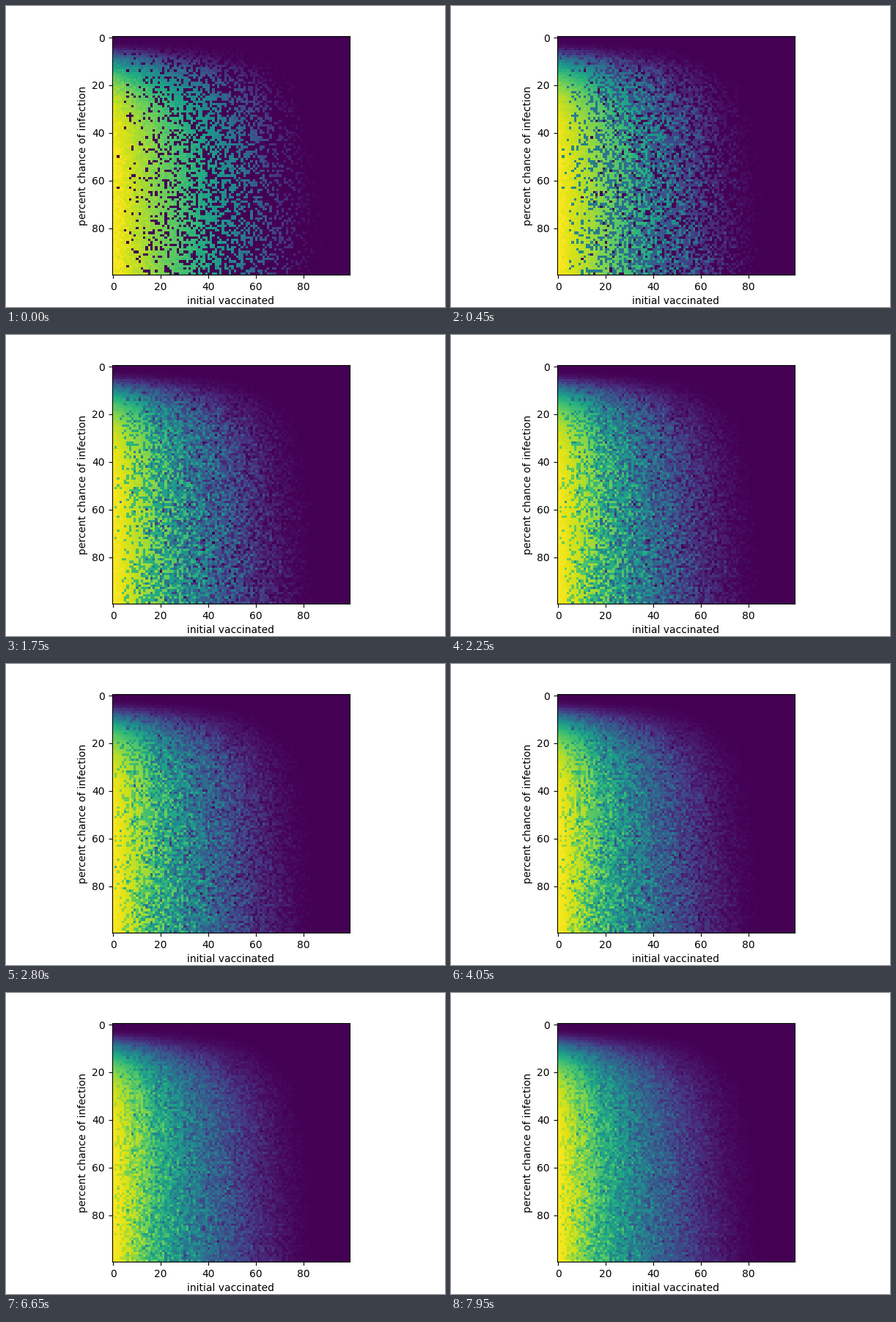
A matplotlib script for the animation above (8000 ms loop, 599 px wide and 410 px high).

```python
import numpy as np
import matplotlib.pyplot as plt
from matplotlib.animation import FuncAnimation

W, H, DPI = 599, 410, 100
STEP, LOOP = 50, 8000
STARTS = [0, 450, 1000, 1750, 2250, 2800, 3450, 4050,
          4700, 5350, 6000, 6650, 7300, 7950]
N = 100
LEFT, TOP, SIDE = 144.5, 41.4, 324.7

rng = np.random.default_rng(7)
chance = np.arange(N)[:, None]                    # percent, down the rows
open_share = 1 - np.arange(N)[None, :] / N        # unvaccinated, along columns
contact = chance * open_share

# Expected outbreak size: a soft threshold in the infection chance, cut off
# where too few unvaccinated neighbours are left to pass it on.
spread = 1 - np.exp(-np.log1p(np.exp(contact - 4.5)) / 9)
linked = 1 - np.exp(-(open_share / 0.3) ** 2)
size = open_share * spread * linked
sigma = 0.012 + 0.4 * np.exp(-contact / 5) + 0.5 * np.exp(-open_share / 0.2)
start_odds = open_share + rng.normal(0, 0.02, (1, N)) * (open_share < 0.95)


def run():
    """One trial per cell; it stays at zero if the first case is vaccinated."""
    caught = rng.random((N, N)) < start_odds
    return caught * np.clip(size * (1 + sigma * rng.normal(size=(N, N))), 0, 1)


runs = np.array([run() for _ in STARTS])
means = np.cumsum(runs, axis=0) / np.arange(1, len(runs) + 1)[:, None, None]

# The small margin keeps the pixel size from being rounded down.
fig = plt.figure(figsize=((W + 0.01) / DPI, (H + 0.01) / DPI), dpi=DPI,
                 facecolor="white")
ax = fig.add_axes([LEFT / W, 1 - (TOP + SIDE) / H, SIDE / W, SIDE / H])
image = ax.imshow(means[0], cmap="viridis", vmin=0, vmax=1,
                  interpolation="nearest", aspect="auto")
ax.set_xticks(range(0, N, 20))
ax.set_yticks(range(0, N, 20))
ax.set_xlabel("initial vaccinated")
ax.set_ylabel("percent chance of infection")


def draw(i):
    shown = np.searchsorted(STARTS, i * STEP, side="right") - 1
    image.set_data(means[shown])
    return [image]


anim = FuncAnimation(fig, draw, frames=LOOP // STEP, interval=STEP,
                     repeat=True, repeat_delay=0, blit=False)
plt.show()
```
